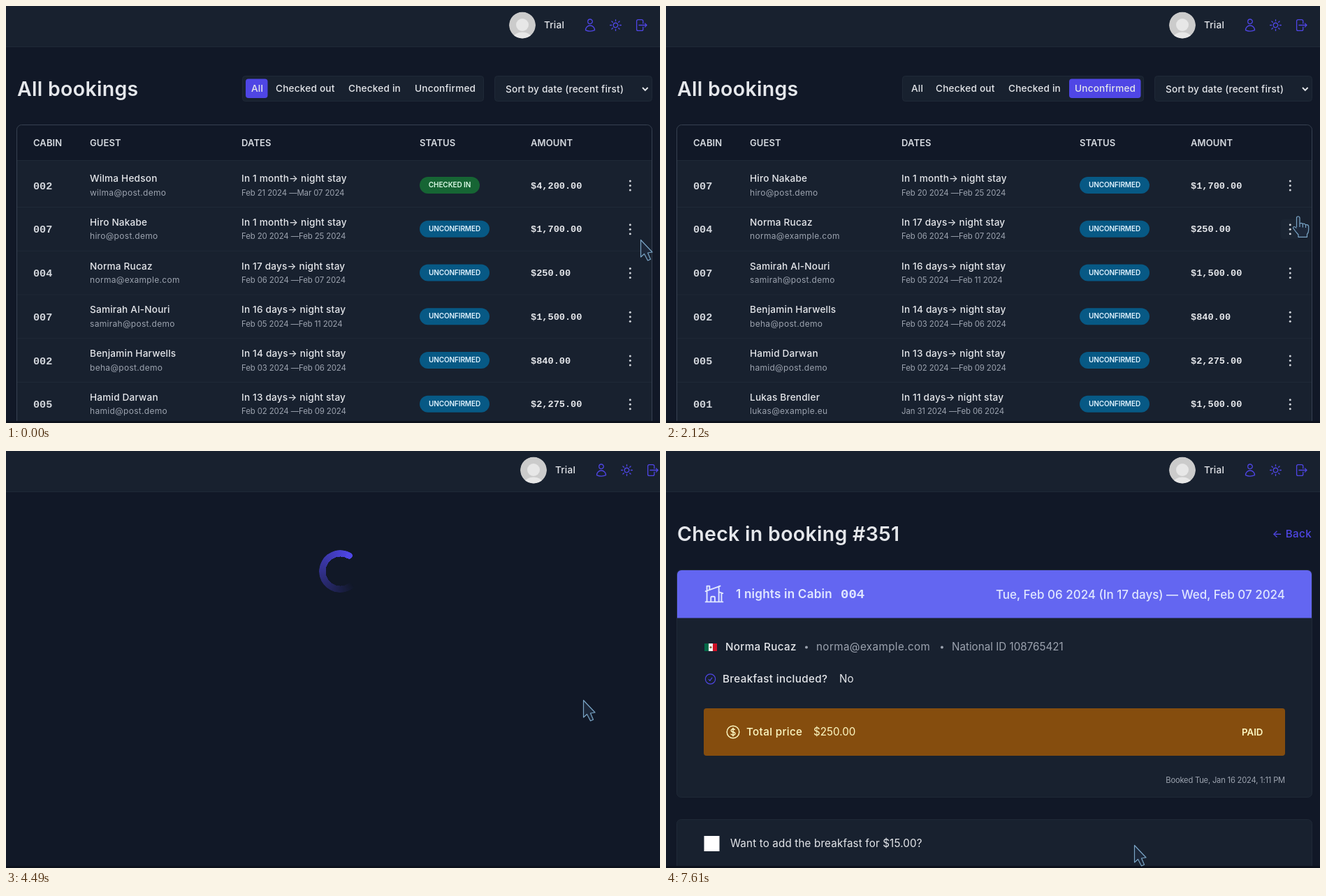
An HTML page for the animation above (8000 ms loop, 936x598 px).

```html
<!DOCTYPE html>
<html lang="en">
<head>
<meta charset="utf-8">
<title>Bookings</title>
<style>
html, body { margin: 0; width: 100%; height: 100%; overflow: hidden; background: #111827; }
body { position: relative; }
svg { display: block; width: 936px; height: 598px; }
text { font: 400 15.2px Inter, "Open Sans", sans-serif; fill: #e5e7eb; white-space: pre; }
.h1 { font-size: 28.5px; font-weight: 600; letter-spacing: .3px; }
.med { font-size: 13.6px; font-weight: 500; letter-spacing: .2px; }
.th { font-size: 13px; font-weight: 600; letter-spacing: .1px; fill: #d6dae0; }
.mail { font-size: 12px; letter-spacing: .3px; fill: #9ca3af; }
.date { font-size: 11.4px; letter-spacing: -.1px; fill: #9ca3af; }
.note { font-size: 11.2px; letter-spacing: -.2px; fill: #9ca3af; }
.tag { font-size: 10px; font-weight: 600; letter-spacing: -.1px; }
.mono { font: 700 15.2px "Liberation Mono", monospace; fill: #d1d5db; }
.cash { font-size: 13.6px; fill: #e5e7eb; }
.big { font-size: 17.1px; font-weight: 600; letter-spacing: .2px; fill: #e0e7ff; }
.span { font-size: 17px; font-weight: 500; fill: #e0e7ff; }
.lead { font-weight: 500; letter-spacing: .35px; }
.dim { fill: #9ca3af; }
.gold { fill: #fef9c3; }
.mid { text-anchor: middle; }
.end { text-anchor: end; }
.icon { fill: none; stroke-width: 1.5; stroke-linecap: round; stroke-linejoin: round; }
#spin {
  position: absolute; left: 447.5px; width: 61px; height: 61px; border-radius: 50%;
  background: radial-gradient(farthest-side, #4f46e5 94%, transparent) top/9.5px 9.5px no-repeat,
    conic-gradient(transparent 30%, #4f46e5);
  -webkit-mask: radial-gradient(farthest-side, transparent calc(100% - 9.5px), #000 0);
  mask: radial-gradient(farthest-side, transparent calc(100% - 9.5px), #000 0);
}
</style>
</head>
<body>
<svg id="stage" viewBox="0 0 936 598"></svg>
<div id="spin"></div>
<script>
const BRAND = '#4f46e5', PANEL = '#18212f', LINE = '#1f2937';

const text = (x, y, s, cls = '', fill) =>
  `<text x="${x}" y="${y}" class="${cls}"${fill ? ` style="fill:${fill}"` : ''}>${s}</text>`;
const rect = (x, y, w, h, fill, r = 0, more = '') =>
  `<rect x="${x}" y="${y}" width="${w}" height="${h}" rx="${r}" fill="${fill}" ${more}/>`;
const box = (x, y, w, h, stroke = LINE, r = 4, fill = PANEL) =>
  rect(x + .5, y + .5, w - 1, h - 1, fill, r, `stroke="${stroke}"`);
const dot = (x, y, r, fill) => `<circle cx="${x}" cy="${y}" r="${r}" fill="${fill}"/>`;
const group = (id, body) => `<g id="${id}">${body}</g>`;
// 24-unit line icon centred at x, y
const icon = (x, y, size, color, d) =>
  `<path class="icon" stroke="${color}" d="${d}" transform="translate(${x - size / 2} ${y - size / 2}) scale(${size / 24})"/>`;

const ICONS = {
  user: 'M15.75 6a3.75 3.75 0 1 1-7.5 0 3.75 3.75 0 0 1 7.5 0zM4.5 20.1a7.5 7.5 0 0 1 15 0A18 18 0 0 1 12 21.75c-2.7 0-5.2-.6-7.5-1.65z',
  sun: 'M12 3v2.25m6.36.39l-1.59 1.59M21 12h-2.25m-.39 6.36l-1.59-1.59M12 18.75V21m-4.77-4.23l-1.59 1.59M5.25 12H3m4.23-4.77L5.64 5.64M15.75 12a3.75 3.75 0 1 1-7.5 0 3.75 3.75 0 0 1 7.5 0z',
  exit: 'M15.75 9V5.25A2.25 2.25 0 0 0 13.5 3h-6a2.25 2.25 0 0 0-2.25 2.25v13.5A2.25 2.25 0 0 0 7.5 21h6a2.25 2.25 0 0 0 2.25-2.25V15m3 0l3-3m0 0l-3-3m3 3H9',
  home: 'M8.25 21v-4.9c0-.6.5-1.1 1.1-1.1h2.3c.6 0 1.1.5 1.1 1.1V21h4.5V3.55M12.75 21h7.5V10.75M2.25 21h19.5M2.25 9l4.5-1.64M18.75 3l-1.5.55m0 6.2l4.5 1.5M6.75 7.36V3h-3v18m3-13.64l10.5-3.81',
  check: 'M9 12.75L11.25 15 15 9.75M21 12a9 9 0 1 1-18 0 9 9 0 0 1 18 0z',
  dollar: 'M12 6v12m-3-2.8l.9.65c1.15.9 3 .9 4.2 0 1.17-.9 1.17-2.3 0-3.2C13.5 12.2 12.75 12 12 12c-.7 0-1.45-.2-2-.66-1.1-.88-1.1-2.3 0-3.18 1.1-.88 2.9-.88 4 0l.4.34M21 12a9 9 0 1 1-18 0 9 9 0 0 1 18 0z',
  eye: 'M2 12C5 6 9 5 12 5s7 1 10 7c-3 6-7 7-10 7S5 18 2 12zM15 12a3 3 0 1 1-6 0 3 3 0 0 1 6 0z',
  into: 'M9 8H6v13h12V8h-3M12 2v12m-3-3l3 3 3-3',
  bin: 'M4 6h16M9 6V3h6v3M6 6l1 15h10l1-15M10 10v7m4-7v7'
};

const OPEN = ['UNCONFIRMED', '#075985', '#e0f2fe', 100], IN = ['CHECKED IN', '#166534', '#dcfce7', 86];
const tag = (x, y, [label, fill, ink, w]) =>
  rect(x, y - 12, w, 24, fill, 12) + text(x + w / 2, y + 3.2, label, 'tag mid', ink);

const BOOKINGS = [
  ['002', 'Wilma Hedson', 'wilma@post.demo', '1 month', 'Feb 21', 'Mar 07', '4,200', IN],
  ['007', 'Hiro Nakabe', 'hiro@post.demo', '1 month', 'Feb 20', 'Feb 25', '1,700', OPEN],
  ['004', 'Norma Rucaz', 'norma@example.com', '17 days', 'Feb 06', 'Feb 07', '250', OPEN],
  ['007', 'Samirah Al-Nouri', 'samirah@post.demo', '16 days', 'Feb 05', 'Feb 11', '1,500', OPEN],
  ['002', 'Benjamin Harwells', 'beha@post.demo', '14 days', 'Feb 03', 'Feb 06', '840', OPEN],
  ['005', 'Hamid Darwan', 'hamid@post.demo', '13 days', 'Feb 02', 'Feb 09', '2,275', OPEN],
  ['001', 'Lukas Brendler', 'lukas@example.eu', '11 days', 'Jan 31', 'Feb 06', '1,500', OPEN]
];

const row = ([cabin, name, mail, when, from, to, cash, state], i) => {
  const y = 257 + 62.75 * i;
  return text(39, y + 5.5, cabin, 'mono') +
    text(120, y - 5, name, 'med') + text(120, y + 14.7, mail, 'mail') +
    text(337, y - 5, `In ${when}→ night stay`, 'med') +
    text(337, y + 14.7, `${from} 2024 —${to} 2024`, 'date') +
    tag(592, y, state) + text(751, y + 4.5, `$${cash}.00`, 'mono cash') +
    [-6, .5, 7].map(d => dot(893.3, y + d, 1.5, '#d1d5db')).join('') +
    rect(16, y + 31, 908, 1, LINE);
};

const header = rect(0, 0, 936, 58, PANEL) + rect(0, 58, 936, 1, LINE) + group('user',
  `<clipPath id="face"><circle cx="739" cy="27.5" r="19"/></clipPath>
   <g clip-path="url(#face)">${dot(739, 27.5, 19, '#cbcbcb')}${dot(739, 27, 9, '#e7e7e7')}
   <ellipse cx="739" cy="46" rx="13" ry="8.5" fill="#e7e7e7"/></g>` +
  text(770, 32, 'Trial', 'med') +
  icon(836, 27.5, 21, BRAND, ICONS.user) + icon(872.5, 27.5, 21, BRAND, ICONS.sun) +
  icon(908.5, 27.5, 21, BRAND, ICONS.exit));

const filters = text(16, 129, 'All bookings', 'h1') + group('tools',
  box(338, 100, 346, 37) +
  rect(343, 104.5, 31.5, 27.5, BRAND, 4, 'id="pickAll"') +
  rect(577, 104.5, 102.5, 27.5, BRAND, 4, 'id="pickOpen"') +
  [[351, 'All'], [386, 'Checked out'], [490, 'Checked in'], [585, 'Unconfirmed']]
    .map(([x, s]) => text(x, 123, s, 'med')).join('') +
  box(699, 100, 226, 37) + text(715, 123.5, 'Sort by date (recent first)', 'med') +
  '<path d="M911 117l3.8 3.8 3.8-3.8" fill="none" stroke="#e5e7eb" stroke-width="1.9"/>');

const table = box(15, 170, 910, 460, '#374151', 7) +
  `<path d="M16 222V178a7 7 0 0 1 7-7H917a7 7 0 0 1 7 7V222z" fill="#111827"/>` +
  rect(16, 221, 908, 1, LINE) +
  [[39, 'CABIN'], [120, 'GUEST'], [337, 'DATES'], [592, 'STATUS'], [751, 'AMOUNT']]
    .map(([x, s]) => text(x, 200.7, s, 'th')).join('') +
  rect(880, 306, 28, 28, LINE, 4, 'id="dotsHover"') +
  group('rowsAll', BOOKINGS.slice(0, 6).map(row).join('')) +
  group('rowsOpen', BOOKINGS.slice(1).map(row).join('')) +
  group('menu',
    rect(880, 306, 28, 28, 'none', 4, `stroke="${BRAND}" stroke-width="2"`) +
    rect(751, 345, 157, 110, '#000', 6, 'opacity=".25"') + rect(751, 343, 157, 110, PANEL, 6) +
    [['eye', 'See details'], ['into', 'Check in'], ['bin', 'Delete']].map(([k, s], i) =>
      icon(781.5, 361.5 + 36.7 * i, 15.2, '#6b7280', ICONS[k]) +
      text(804, 366 + 36.7 * i, s, 'med')).join(''));

const card = text(924, 123.5, '← Back', 'lead end', BRAND) + box(15, 170, 910, 327, LINE, 6) +
  `<path d="M16 239.5V177a6 6 0 0 1 6-6H918a6 6 0 0 1 6 6V239.5z" fill="#6366f1"/>` +
  icon(69, 205, 30.4, '#e0e7ff', ICONS.home) +
  text(100, 211, '1 nights in Cabin', 'big') +
  `<text x="250" y="211" class="mono" style="font-size:19px;fill:#e0e7ff">004</text>` +
  text(886, 212, 'Tue, Feb 06 2024 (In 17 days) — Wed, Feb 07 2024', 'span end') +
  group('flag', rect(55, 276, 6, 11, '#006847') + rect(61, 276, 6, 11, '#f3f4f6') +
    rect(67, 276, 6, 11, '#ce1126') + dot(64, 281.5, 1.6, '#8a6b3c')) +
  group('guest', text(85, 286, 'Norma Rucaz', 'lead') + dot(201, 281.5, 2, '#9ca3af') +
    `<text x="215" y="286" class="dim" style="letter-spacing:.4px">norma@example.com</text>` +
    dot(395, 281.5, 2, '#9ca3af') + text(409, 286, 'National ID 108765421', 'dim')) +
  icon(63.5, 327, 19, BRAND, ICONS.check) +
  text(81, 332, 'Breakfast included?', 'lead') + text(248, 332, 'No') +
  rect(54, 369, 832, 68, '#854d0e', 4) + icon(96, 403, 23.5, '#fef9c3', ICONS.dollar) +
  text(115, 408, 'Total price', 'lead gold') + text(211, 408, '$250.00', 'gold') +
  `<text x="824" y="408" class="gold" style="font-size:13.3px;font-weight:600">PAID</text>` +
  text(886, 476, 'Booked Tue, Jan 16 2024, 1:11 PM', 'note end');

const detail = text(16, 129, 'Booking #351', 'h1') + tag(233.5, 118.3, [...OPEN.slice(0, 3), 99]) +
  rect(617.5, 528, 88.5, 44, BRAND, 4) + rect(617.5, 528, 88.5, 44, '#4338ca', 4, 'id="inHover"') +
  text(662, 554.5, 'Check In', 'med mid', '#eef2ff') +
  rect(717.5, 528, 131, 44, '#b91c1c', 4) + rect(717.5, 528, 131, 44, '#991b1b', 4, 'id="delHover"') +
  text(783, 554.5, 'Delete Booking', 'med mid', '#fee2e2') +
  box(860, 528, 65, 44, '#374151') + text(892, 554.5, 'Back', 'med mid');

const checkin = text(16, 129, 'Check in booking #351', 'h1') + box(15, 528, 910, 90, LINE, 6) +
  rect(54.5, 552, 22, 22, '#fff') +
  `<text x="92" y="567.5" style="letter-spacing:.15px">Want to add the breakfast for $15.00?</text>`;

const pointer = 'fill="#1c2739" stroke="#7aa5c6" stroke-width="1.2" stroke-linejoin="round"';
const cursor = group('cursor',
  `<circle id="click" r="11.5" fill="#f0e613" opacity=".6"/>
   <path id="arrow" ${pointer} d="M.5 .5V25L5.5 20.5L10.5 30L14.5 28.3L10.5 19L17 18Z"/>
   <path id="hand" ${pointer} d="M-1.5 16V3A2.2 2.2 0 0 1 3 3V11Q5.5 9.5 7.3 11.5Q9.8 10.5 11.5 12.8Q15 12 15.7 15V20Q15.7 24 13.5 26.5V30.3H1V27Q-3 22.5 -6.5 17.5Q-6.3 13.5 -1.5 17.5M3 11V16M7.3 12V16.5M11.5 13V17"/>
   <g id="ban"><circle r="6" fill="#fff" stroke="#fff" stroke-width="4"/>
   <path d="M-4.3 -4.3L4.3 4.3M6 0A6 6 0 1 1 -6 0A6 6 0 1 1 6 0" fill="none" stroke="#d3141c" stroke-width="2.4"/></g>`);

const stage = document.getElementById('stage');
stage.innerHTML = rect(0, 0, 936, 598, '#111827') + header +
  group('list', filters + group('table', table)) +
  group('booking', card + group('detail', detail) + group('checkin', checkin)) +
  rect(0, 595, 936, 3, '#0c111c') + cursor;

const el = Object.fromEntries([...document.querySelectorAll('[id]')].map(e => [e.id, e]));
const show = (id, on) => { el[id].style.display = on ? '' : 'none'; };
const fade = (id, v) => el[id].setAttribute('opacity', v);
const ramp = (t, from, ms) => Math.max(0, Math.min(1, (t - from) / ms));
const within = (t, a, b) => t >= a && t < b;

// start time, number of steps, waypoints evenly spread over the trip
const TRIPS = [
  [70, 12, [908, 335], [840, 300], [720, 225], [640, 180], [630, 130], [623, 110], [623, 110], [623, 110]],
  [1430, 12, [623, 110], [633, 110], [705, 148], [790, 180], [855, 212], [913, 285], [895, 317]],
  [2260, 4, [895, 317], [891, 323]],
  [3610, 5, [891, 323], [870, 335], [815, 352], [775, 356], [800, 357], [826, 357]],
  [5490, 12, [826, 357], [790, 405], [772, 450], [760, 490], [750, 520], [745, 545], [742, 556]],
  [6460, 7, [742, 556], [730, 558], [716, 561], [702, 563], [690, 564], [680, 565], [673, 565], [670, 565]]
];
const STEP = 69.1;

function place(t) {
  const trip = TRIPS.filter(p => t >= p[0]).pop();
  if (!trip) return TRIPS[0][2];
  const [from, steps, ...pts] = trip;
  const k = Math.min(steps, Math.floor((t - from) / STEP + .02) + 1);
  const u = k / steps * (pts.length - 1), i = Math.min(pts.length - 2, Math.floor(u + 1e-6));
  return pts[i].map((a, j) => a + (pts[i + 1][j] - a) * (u - i));
}

const LOOKS = [[0, 'arrow'], [520, 'hand'], [760, 'ban'], [1495, 'arrow'], [2120, 'hand'],
  [4420, 'arrow'], [6040, 'hand'], [7610, 'arrow']];
const CLICKS = [[620, 760], [3200, 3400], [4350, 4420], [7470, 7600]];

function draw(t) {
  const listLoad = within(t, 690, 830), pageLoad = within(t, 4420, 4560);
  const loading = listLoad || pageLoad;
  const shift = `translate(${loading ? 16 : 0} 0)`;
  el.user.setAttribute('transform', shift);
  el.tools.setAttribute('transform', shift);

  show('list', t < 4420);
  show('table', !listLoad);
  show('rowsAll', t < 690);
  show('rowsOpen', t >= 690);
  show('menu', t >= 3270);
  fade('pickAll', 1 - ramp(t, 660, 300));
  fade('pickOpen', ramp(t, 520, 300));
  fade('dotsHover', ramp(t, 2020, 200) * (1 - ramp(t, 3610, 260)));

  show('spin', loading);
  el.spin.style.top = (listLoad ? 212 : 142) + 'px';
  el.spin.style.transform = `rotate(${(t - (listLoad ? 690 : 4370)) / 1500 * 360}deg)`;

  show('booking', t >= 4560);
  show('detail', t < 7540);
  show('checkin', t >= 7540);
  show('flag', t >= 4760);
  el.guest.setAttribute('transform', `translate(${t < 4760 ? -18 : 0} 0)`);
  fade('delHover', ramp(t, 6040, 220) * (1 - ramp(t, 6460, 300)));
  fade('inHover', ramp(t, 6590, 290));

  const look = LOOKS.filter(l => t >= l[0]).pop()[1];
  for (const id of ['arrow', 'hand', 'ban']) show(id, id === look);
  show('click', CLICKS.some(c => within(t, ...c)));
  el.cursor.setAttribute('transform', `translate(${place(t)})`);
}

const began = performance.now();
function tick() {
  draw((performance.now() - began) % 8000);
  requestAnimationFrame(tick);
}
tick();
</script>
</body>
</html>
```
